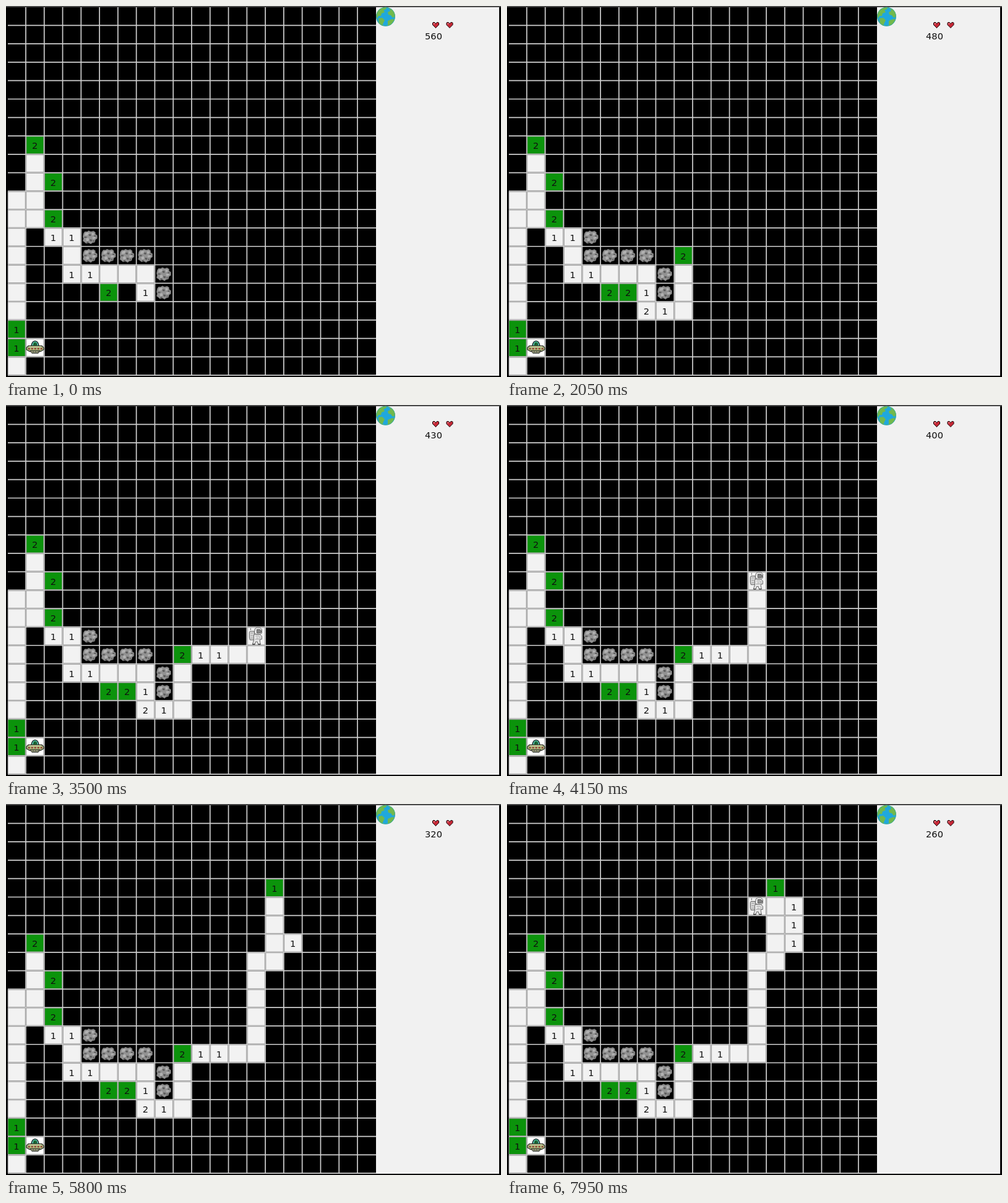
Animation of 800 by 600 pixels, one loop 8000 ms. Source, as an HTML page:

```html
<!DOCTYPE html>
<html lang="en">
<head>
<meta charset="utf-8">
<title>Space grid</title>
<style>
  html, body { margin: 0; width: 100%; height: 100%; overflow: hidden; background: #000; }
  svg { display: block; width: 800px; height: 600px; }
  text { font: 14.6px "DejaVu Sans", sans-serif; text-anchor: middle; fill: #101010; }
  .cell { stroke: #a2a2a2; stroke-width: .8; }
</style>
</head>
<body>
<svg viewBox="0 0 800 600">
  <defs>
    <g id="rock">
      <path d="M4 9 6 6 10 6 12 4.500 16 6 20 5 23 7 23 10 26 12 26 17 23 19 22 23 18 24 16 26 12 24 8 25 6 23 3 21 4 17 3 14Z" fill="#929292" stroke="#626262" stroke-width=".8"/>
      <path d="M7 8 11 7 13 9 10 12 6 12ZM17 8 21 8 21 11 18 12ZM18 15 23 14 23 17 19 18ZM8 17 12 16 13 20 9 22Z" fill="#b2b2b2"/>
      <path d="M12 10h4v3h-3ZM5 14h4v2H5ZM14 18l4 1-1 3-3-1ZM21 12l3 0 0 2-3 0ZM9 22h3v2H9ZM19 20h2v2h-2Z" fill="#5c5c5c"/>
    </g>
    <g id="ufo">
      <path d="M9 13C9 1 21 1 21 13Z" fill="#55b9a9" stroke="#202a2a" stroke-width="1.400"/>
      <path d="M12 12V8h1V6h4v2h1v4Z" fill="#238443"/>
      <path d="M13 8h1.500v2H13ZM16 8h1.500v2H16Z" fill="#101810"/>
      <path d="M1 15 4 12H26L29 15V18L24 21H6L1 18Z" fill="#a8b27a" stroke="#292b24" stroke-width="1.200"/>
      <path d="M5 13.500H25" stroke="#e0dfb0" stroke-width="1.300"/>
      <path d="M4 16.500H27" stroke="#963e36" stroke-width="2.500" stroke-dasharray="2.500 2.500"/>
      <path d="M7 20H23L20 24H10Z" fill="#777d69" stroke="#292b24"/>
      <path d="M9 21.500H21" stroke="#d4cf91" stroke-dasharray="2 2"/>
    </g>
    <g id="astronaut" stroke="#555" stroke-width=".9">
      <path d="M6 5V2M5 7H12V21H5L4 17V9Z" fill="#d5d5d5"/>
      <path d="M12 12H21L24 15 24 20 21 20V23L22 28H18L17 24 14 24 13 28H9L11 22V14Z" fill="#e8e8e8"/>
      <path d="M13 3 16 1H21L24 4V10L21 12H15L12 9Z" fill="#eee"/>
      <path d="M16 4H21L23 6V9L20 10H16Z" fill="#858585"/>
      <path d="M6 10H10M6 14H10M6 18H10M14 15H20M15 18H19M21 15V19M13 20H20" fill="none" stroke="#999"/>
      <path d="M9 28H13M18 28H22" stroke="#333" stroke-width="1.400"/>
    </g>
    <g id="heart">
      <path d="M1 0H4V1H5V2H6V1H7V0H10V1H11V5H10V6H9V7H8V8H7V9H6V10H5V9H4V8H3V7H2V6H1V5H0V1H1Z" fill="#181014"/>
      <path d="M1 1H4V2H5V3H6V2H7V1H10V5H9V6H8V7H7V8H6V9H5V8H4V7H3V6H2V5H1Z" fill="#c62836"/>
      <path d="M2 2H4V3H3V4H2Z" fill="#f3a0a4"/>
    </g>
    <clipPath id="globe"><circle cx="613.500" cy="17.300" r="15.500"/></clipPath>
  </defs>
  <rect width="800" height="600"/>
  <path id="grid" stroke="#cfcfcf" stroke-width="1.700"/>
  <rect x="598" y="2" width="199" height="596" fill="#f1f1f1"/>
  <rect width="800" height="2" fill="#494949"/>
  <g clip-path="url(#globe)">
    <rect x="597" y="1" width="33" height="33" fill="#20a8dc"/>
    <path d="M598 14 601 6 608 2 616 1 614 5 610 7 612 10 607 12 606 16 602 16 600 20ZM619 3 627 7 630 16 625 19 622 15 618 14 617 10 621 8ZM602 20 608 19 612 23 610 27 608 32 603 29ZM617 24 624 21 628 22 622 31 617 31Z" fill="#72b94b"/>
    <circle cx="613.500" cy="17.300" r="15" fill="none" stroke="#4aae82" stroke-width="1"/>
  </g>
  <use href="#heart" x="689" y="26"/>
  <use href="#heart" x="711.500" y="26"/>
  <text id="score" x="691" y="54"></text>
  <g id="cells"></g>
  <use id="player" href="#astronaut"/>
  <g id="labels"></g>
</svg>
<script>
const SIZE = 29.78, LEFT = 2.2, TOP = 1.6, LOOP = 8000;
const $ = id => document.getElementById(id);
const px = col => LEFT + col * SIZE;
const py = row => TOP + row * SIZE;

function add(parent, tag, attrs, text = "") {
  const el = document.createElementNS("http://www.w3.org/2000/svg", tag);
  for (const name in attrs) el.setAttribute(name, attrs[name]);
  el.textContent = text;
  return parent.appendChild(el);
}

let lines = "";
for (let i = 1; i <= 20; i++) {
  if (i < 20) lines += `M${px(i)} 2V598`;
  lines += `M3 ${py(i)}H598`;
}
$("grid").setAttribute("d", lines);

// Cell contents; a "g" prefix marks a green cell, which covers the player.
const content = {
  "0,17": "g1", "0,18": "g1", "1,7": "g2", "2,9": "g2", "2,11": "g2",
  "2,12": "1", "3,12": "1", "3,14": "1", "4,14": "1", "5,15": "g2",
  "7,15": "1", "6,15": "g2", "7,16": "2", "8,16": "1", "9,13": "g2",
  "10,13": "1", "11,13": "1", "15,7": "1", "14,4": "g1", "15,5": "1", "15,6": "1"
};
const isGreen = key => (content[key] || "")[0] === "g";

const opened = new Map();
const open = (col, row, step = 0) => {
  const key = `${col},${row}`;
  if (!opened.has(key)) opened.set(key, step);
};
const column = (col, from, to) => { for (let r = from; r <= to; r++) open(col, r); };

column(0, 10, 19);
column(1, 7, 11);
column(3, 12, 14);
for (let c = 4; c <= 7; c++) open(c, 14);
for (const [c, r] of [[1, 18], [2, 9], [2, 11], [2, 12], [5, 15], [7, 15]]) open(c, r);

const moves = "RRDRR" + "UUU" + "RRRRU" + "UUUURUR" + "LUUUDRD" + "ULL";
const delta = { R: [1, 0], L: [-1, 0], U: [0, -1], D: [0, 1] };
const path = [[5, 15]];
for (const move of moves) {
  const [c, r] = path[path.length - 1], [dx, dy] = delta[move];
  path.push([c + dx, r + dy]);
  open(c + dx, r + dy, path.length - 1);
}

// Each stretch: start, end, number of evenly spaced moves.
const stepTimes = [
  [0, 1200, 5], [1200, 2050, 3], [2050, 3500, 5],
  [3500, 4850, 7], [4850, 6750, 7], [6750, 7950, 3]
].flatMap(([from, to, n]) =>
  Array.from({ length: n }, (_, i) => from + (i + .5) / n * (to - from)));

const timed = [];
for (const [key, step] of opened) {
  const [c, r] = key.split(",").map(Number);
  const fill = isGreen(key) ? "#0b930b" : key === "1,18" ? "#fff" : "#f2f2f2";
  timed.push([step, add($("cells"), "rect", {
    class: "cell", x: px(c) + .9, y: py(r) + .9, width: SIZE - 1.8, height: SIZE - 1.8, fill
  })]);
  if (content[key]) timed.push([step, add($("labels"), "text",
    { x: px(c) + 14.7, y: py(r) + 21 }, content[key].slice(-1))]);
}

const sprite = (name, c, r) => add($("cells"), "use", { href: "#" + name, x: px(c), y: py(r) });
for (const [c, r] of [[4, 12], [4, 13], [5, 13], [6, 13], [7, 13], [8, 14], [8, 15]]) sprite("rock", c, r);
sprite("ufo", 1, 18);

let shown = -1;
function draw(now) {
  const t = now % LOOP;
  const step = stepTimes.filter(time => time <= t).length;
  if (step !== shown) {
    shown = step;
    const [c, r] = path[step];
    for (const [from, el] of timed) el.style.display = from <= step ? "" : "none";
    $("player").setAttribute("x", px(c));
    $("player").setAttribute("y", py(r));
    $("player").style.display = isGreen(`${c},${r}`) ? "none" : "";
    $("score").textContent = 560 - step * 10;
  }
  requestAnimationFrame(draw);
}
draw(0);
</script>
</body>
</html>
```
